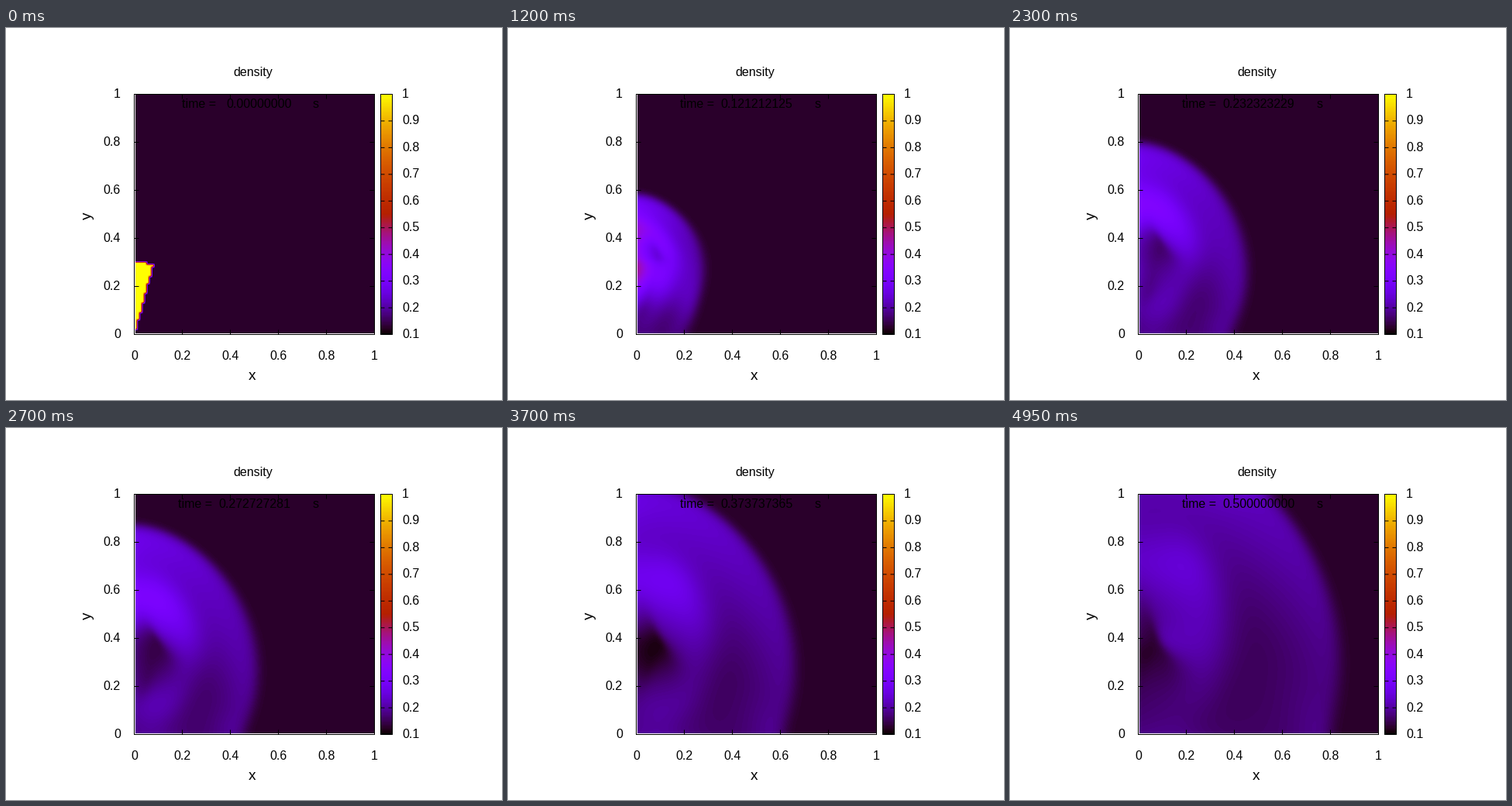
Recreate the animation shown at these times as a matplotlib script. Size 640 by 480 pixels, loop 5000 ms.

```python
import numpy as np
import matplotlib.pyplot as plt
from matplotlib.animation import FuncAnimation

W, H, DPI = 640, 480, 100
PX = 72 / DPI                       # one pixel in points
FRAMES, INTERVAL, T_END = 100, 50, 0.5
N, SUBSTEPS, GAMMA = 100, 5, 1.4
JET_SPEED = 1.0                     # upward speed of the dense wedge
LEFT, RIGHT, TOP, BOTTOM = 165.5, 475.5, 85.5, 395.5
BAR_L, BAR_R = 483.5, 498.5
CMAP = plt.get_cmap("gnuplot", 256)


# --- Euler equations, first-order HLL scheme with open boundaries ---

def initial_state():
    c = (np.arange(N) + 0.5) / N
    x, y = np.meshgrid(c, c)
    hot = (np.hypot(x, y) < 0.3) & (np.arctan2(x, y) < np.radians(15))
    rho = np.where(hot, 1.0, 0.125)
    p = np.where(hot, 1.0, 0.1)
    v = np.where(hot, JET_SPEED, 0.0)
    return np.array([rho, 0 * rho, rho * v,
                     p / (GAMMA - 1) + 0.5 * rho * v**2])


def flux_diff_x(state):
    s = np.pad(state, ((0, 0), (0, 0), (1, 1)), mode="edge")
    rho, mx, my, e = s
    u = mx / rho
    p = (GAMMA - 1) * (e - 0.5 * (mx**2 + my**2) / rho)
    c = np.sqrt(GAMMA * p / rho)
    f = np.array([mx, mx * u + p, my * u, (e + p) * u])
    slow, fast = u - c, u + c
    sl = np.minimum(np.minimum(slow[:, :-1], slow[:, 1:]), 0)
    sr = np.maximum(np.maximum(fast[:, :-1], fast[:, 1:]), 0)
    jump = s[..., 1:] - s[..., :-1]
    hll = (sr * f[..., :-1] - sl * f[..., 1:] + sl * sr * jump) / (sr - sl)
    return np.diff(hll, axis=-1)


def flux_diff_y(state):
    swap = [0, 2, 1, 3]
    return flux_diff_x(state[swap].swapaxes(1, 2))[swap].swapaxes(1, 2)


def simulate():
    state = initial_state()
    ratio = T_END / (FRAMES - 1) / SUBSTEPS * N
    history = [state[0].copy()]
    for _ in range(FRAMES - 1):
        for _ in range(SUBSTEPS):
            state = state - ratio * (flux_diff_x(state) + flux_diff_y(state))
        history.append(state[0].copy())
    return history


# --- drawing in pixel coordinates ---

fig = plt.figure(figsize=(W / DPI, H / DPI), dpi=DPI, facecolor="white")
ax = fig.add_axes([0, 0, 1, 1])
ax.axis("off")


def label(x, y, text, size=16, ha="left", **kw):
    return ax.text(x, y, text, fontsize=size * PX, ha=ha, color="black",
                   family="Liberation Sans", zorder=4,
                   **{"va": "baseline", **kw})


def line(x0, y0, x1, y1, color="black", z=3):
    ax.plot([x0, x1], [y0, y1], color=color, lw=PX, zorder=z,
            solid_capstyle="butt", snap=False)


def box(x0, x1):
    ax.plot([x0, x1, x1, x0, x0], [TOP, TOP, BOTTOM, BOTTOM, TOP],
            color="black", lw=PX, zorder=3, solid_joinstyle="miter",
            solid_capstyle="projecting", snap=False)


def image(data, x0, x1, interpolation):
    return ax.imshow(data, cmap=CMAP, vmin=0.1, vmax=1, origin="lower",
                     extent=(x0, x1, BOTTOM, TOP), aspect="auto",
                     interpolation=interpolation, zorder=0)


density = simulate()
field = image(density[0], LEFT, RIGHT, "bilinear")
image(np.linspace(0.1, 1, 256)[:, None], BAR_L, BAR_R, "nearest")
ax.set_xlim(0, W)
ax.set_ylim(H, 0)

# thin uncovered strip beside the left and bottom axes
line(LEFT + 1, TOP, LEFT + 1, BOTTOM, "white", 1)
line(LEFT, BOTTOM - 1, RIGHT, BOTTOM - 1, "white", 1)
box(LEFT, RIGHT)
box(BAR_L, BAR_R)

for i in range(6):
    name = f"{i / 5:g}"
    x = LEFT + 62 * i
    y = BOTTOM - 62 * i
    line(x, BOTTOM, x, BOTTOM - 6)
    line(x, TOP, x, TOP + 6)
    line(LEFT, y, LEFT + 6, y)
    line(RIGHT, y, RIGHT - 6, y)
    label(x, 427.5, name, ha="center")
    label(148, y + 4.5, name, ha="right")

for i in range(10):
    y = BOTTOM - (BOTTOM - TOP) * i / 9
    line(BAR_L, y, BAR_L + 5, y)
    line(BAR_R, y, BAR_R - 5, y)
    label(511, y + 4.5, f"{(i + 1) / 10:g}")

label(318.5, 62, "density", ha="center")
label(318, 454, "x", 19, "center")
label(105, 242, "y", 19, "center", va="center", rotation=90)

clock_name = label(227, 103, "time =")
clock_value = label(284, 103, "")
label(396, 103, "s")


def clock(t):
    """Text of a single-precision time and the x of its two parts."""
    if t == 0:
        return "0.00000000", 227, 284
    if t < 0.1:
        return f"{t:.8E}", 211, 268
    return f"{t:.9f}", 222, 274


def update(k):
    field.set_data(density[k])
    text, x_name, x_value = clock(float(np.float32(k * T_END / (FRAMES - 1))))
    clock_name.set_x(x_name)
    clock_value.set_x(x_value)
    clock_value.set_text(text)
    return field, clock_name, clock_value


anim = FuncAnimation(fig, update, frames=FRAMES, interval=INTERVAL,
                     repeat=True, repeat_delay=0)
plt.show()
```
